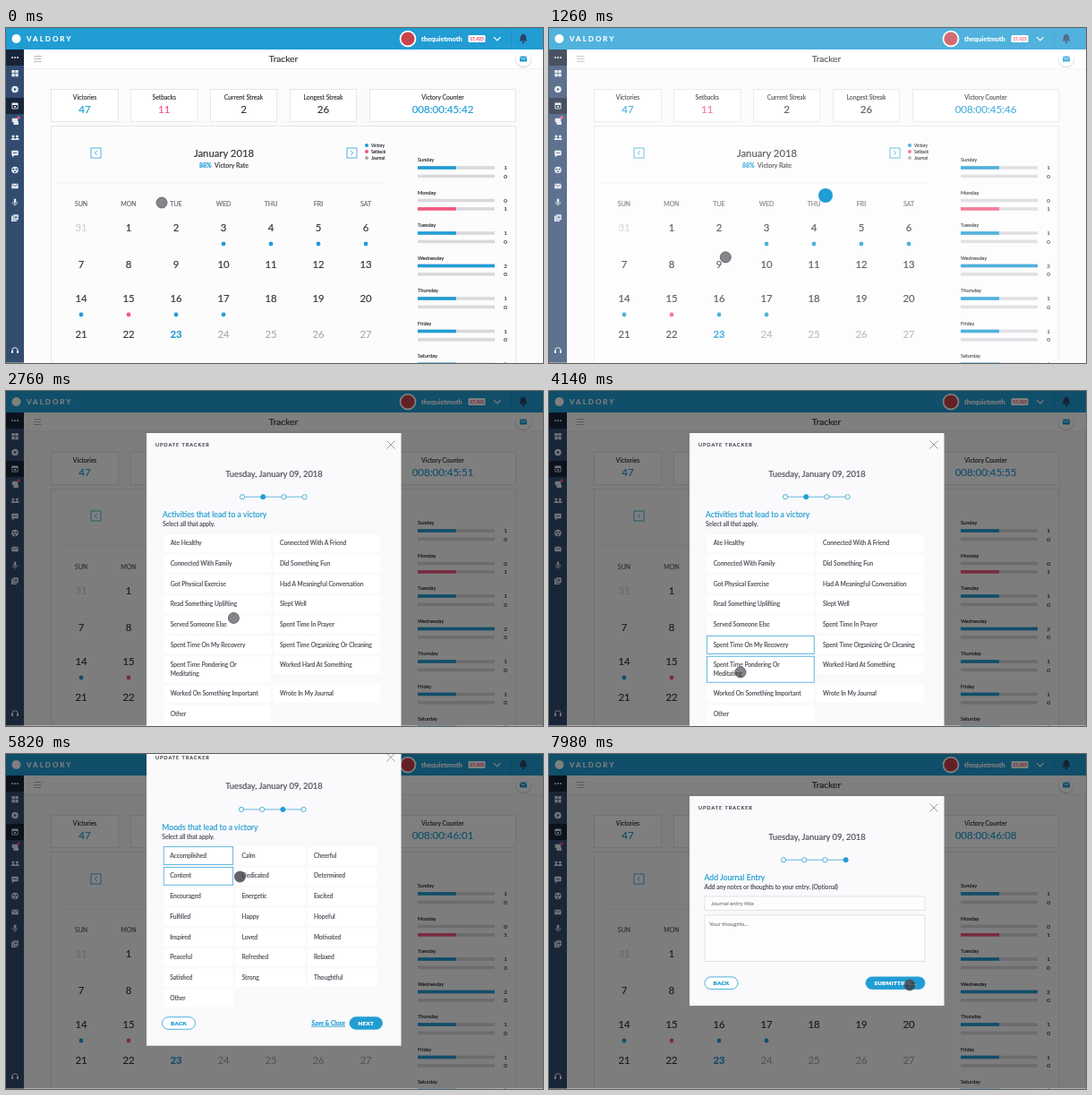
An HTML page that plays this animation: 600x374 px, repeating every 8000 ms.

```html
<!DOCTYPE html>
<html lang="en">
<head>
<meta charset="utf-8">
<title>Tracker</title>
<style>
html, body { margin: 0; width: 100%; height: 100%; overflow: hidden; background: #fcfafc; }
svg { display: block; width: 100%; height: 100%; font-family: Lato, "Open Sans", sans-serif; }
text { fill: currentColor; stroke: currentColor; stroke-width: .18px; }
</style>
</head>
<body>
<svg id="stage" viewBox="0 0 600 374"></svg>
<script>
const LOOP = 8000;
const BLUE = '#219dd4', PINK = '#f4577f', INK = '#33353b', SOFT = '#4c4f57', GREY = '#a9a9ad';

// Moments of the recorded session, in ms
const AT = {
  load: 900, open: 1400, victory: 1860, activities: 2300,
  moods: 4800, journal: 7200, submit: 7700
};

// Cursor path: time, x, y
const PATH = [
  [0, 174, 195], [150, 174, 195], [800, 191, 264], [1180, 191, 264], [1660, 274, 157],
  [1900, 274, 157], [2180, 299, 216], [2350, 299, 216], [3120, 218, 284], [3340, 218, 284],
  [3740, 214, 314], [4260, 214, 314], [4660, 392, 301], [4960, 392, 301], [5280, 214, 114],
  [5400, 214, 114], [5600, 214, 137], [5720, 214, 137], [6000, 374, 137], [6120, 374, 137],
  [6320, 372, 160], [6430, 372, 160], [6620, 365, 205], [6820, 365, 205], [7080, 402, 301],
  [7240, 402, 301], [7620, 403, 258], [8000, 403, 258]
];
const CLICKS = [900, 1860, 2270, 3240, 3800, 4760, 5340, 5660, 6060, 6380, 6690, 7150, 7700];

// ---- markup helpers ----
function text(x, y, s, size, o = {}) {
  const { fill = INK, anchor = 'middle', weight = 400, gap = 0, extra = '' } = o;
  return `<text x="${x}" y="${y + size * 0.36}" font-size="${size}" color="${fill}" ` +
    `text-anchor="${anchor}" font-weight="${weight}" letter-spacing="${gap}" ${extra}>${s}</text>`;
}
const left = (x, y, s, size, o = {}) => text(x, y, s, size, { anchor: 'start', ...o });
const rect = (x, y, w, h, fill, extra = '') =>
  `<rect x="${x}" y="${y}" width="${w}" height="${h}" fill="${fill}" ${extra}/>`;
const circle = (x, y, r, fill, extra = '') =>
  `<circle cx="${x}" cy="${y}" r="${r}" fill="${fill}" ${extra}/>`;
const line = (d, color, w = 1) =>
  `<path d="${d}" fill="none" stroke="${color}" stroke-width="${w}"/>`;
const group = (id, body, extra = '') => `<g id="${id}" ${extra}>${body}</g>`;
const range = n => [...Array(n).keys()];

// ---- page ----
function header() {
  return rect(0, 0, 600, 24, BLUE) +
    circle(11.5, 12, 5, '#fff') +
    left(23, 12, 'VALDORY', 8, { fill: '#fff', weight: 700, gap: 2 }) +
    circle(449, 12, 9.3, '#fff') + circle(449, 12, 7.6, '#c8434a') +
    left(464, 12, 'thequietmoth', 7.5, { fill: '#fff', weight: 700 }) +
    rect(516.5, 8, 19, 8, '#fff', 'rx="1.2"') +
    text(526, 12, '17,425', 5, { fill: PINK, weight: 700 }) +
    line('M545 10.2l3.8 3.8 3.8-3.8', '#fff', 1.2) +
    line('M564.5 3V21', '#1c8dc0', 0.8) +
    '<path d="M573.5 14.5c1.5-1.2 1-5 2-6.3q2.5-2.8 5 0c1 1.3 .5 5.1 2 6.3z" fill="#2b4468"/>' +
    circle(578, 16, 1.3, '#2b4468') +
    rect(20, 24, 580, 21, '#fff') + line('M20 45.3H600', '#ececef', 0.7) +
    line('M31 31.5h8.5M31 34.5h8.5M31 37.5h8.5', '#b5b5ba', 0.9) +
    text(310, 34.3, 'Tracker', 10.2) +
    circle(578, 35, 9.3, '#d6d6da') + circle(578, 34.3, 8.8, '#fff') +
    rect(574, 31.5, 8, 6, BLUE, 'rx=".6"') + line('M574.3 32.3l3.7 2.6 3.7-2.6', '#fff', 0.8);
}

function sidebar() {
  const c = '#e3e9f1';
  const box = (y, w, h) => rect(10 - w / 2, y - h / 2, w, h, c, 'rx=".8"');
  const person = (x, y) => circle(x, y - 1.6, 1.5, c) +
    `<path d="M${x - 2.4} ${y + 2.6}q0-2.4 2.4-2.4t2.4 2.4z" fill="${c}"/>`;
  return rect(0, 24, 20, 350, '#324c70') + rect(0, 24, 20, 18, '#182438') +
    rect(0, 78, 20, 18, '#182438') +
    [7, 10, 13].map(x => circle(x, 33, 0.9, '#fff')).join('') +
    [[6.4, 47], [10.4, 47], [6.4, 51], [10.4, 51]].map(([x, y]) => rect(x, y, 3.3, 3.3, c)).join('') +
    circle(10, 68.5, 3.8, c) + '<path d="M9 66.7l2.8 1.8-2.8 1.8z" fill="#324c70"/>' +
    box(87, 7, 7) + rect(7.4, 86, 5.2, 3.6, '#182438') + rect(9, 87, 2, 1.7, c) +
    box(103, 6.5, 4.5) + rect(8.5, 104.5, 5.5, 3.5, c) + circle(14, 100, 1.7, PINK) +
    person(8, 122.5) + person(12.4, 122.5) +
    box(139.5, 7.5, 5.5) + `<path d="M7 142v2.5l2.5-2.5z" fill="${c}"/>` +
    rect(8, 139, 4, 0.8, '#324c70') +
    circle(10, 158.5, 3.8, c) +
    [[8.4, 157.7], [11.6, 157.7], [10, 160.4]].map(([x, y]) => circle(x, y, 1, '#324c70')).join('') +
    box(176.5, 7.5, 5.6) + line('M6.5 174.5l3.5 2.3 3.5-2.3', '#324c70', 0.7) +
    rect(8.8, 190.5, 2.5, 5, c, 'rx="1.2"') + line('M7.2 194.2q0 2.7 2.8 2.7t2.8-2.7M10 197v1.7', c, 0.8) +
    rect(6, 209.5, 6, 6.5, c) + rect(8, 208, 6, 6.5, c, 'stroke="#324c70" stroke-width=".5"') +
    line('M11 209.5v3.6M9.2 211.3h3.6', '#324c70', 0.8) +
    line('M6.8 361.5v-1.5a3.2 3.2 0 0 1 6.4 0v1.5', c, 1) + rect(6, 360, 2, 3, c) + rect(12, 360, 2, 3, c);
}

function stats() {
  const card = (x, w, label, value, fill, id) =>
    rect(x, 68.5, w, 36, '#fff', 'stroke="#dddde1" stroke-width=".7"') +
    text(x + w / 2, 78, label, 6.8) +
    text(x + w / 2, 91.3, value, 11.5, { fill, extra: `stroke-width=".3" ${id ? `id="${id}"` : ''}` });
  return card(50.5, 75, 'Victories', 47, BLUE) + card(139.5, 74.5, 'Setbacks', 11, PINK) +
    card(228.5, 74, 'Current Streak', 2, INK) + card(317.5, 74, 'Longest Streak', 26, INK) +
    card(406.5, 163, 'Victory Counter', '', BLUE, 'counter');
}

function calendar() {
  const colX = i => 84 + 53 * i, rowY = [222.5, 264, 301.5, 342.3];
  const arrow = (x, d) => rect(x, 134, 11, 11, '#fff', `stroke="${BLUE}" stroke-width=".8"`) +
    line(`M${x + 5.5 - d * 1.2} 137.2l${d * 2.4} 2.3l${-d * 2.4} 2.3`, BLUE, 0.9);
  let s = rect(50.5, 109.5, 519, 280, '#fdfcfd', 'stroke="#dddde1" stroke-width=".7"') +
    arrow(95, -1) + arrow(381, 1) +
    text(243.5, 139.5, 'January 2018', 11.3) +
    left(216, 153.3, '88%', 6.8, { fill: BLUE, weight: 700 }) + left(233, 153.3, 'Victory Rate', 7) +
    line('M58 173H422', '#e6e6ea', 0.7);
  ['Victory', 'Setback', 'Journal'].forEach((name, i) => {
    s += circle(403, 131 + 7 * i, 2.1, [BLUE, PINK, GREY][i]) + left(408, 131 + 7 * i, name, 4.7);
  });
  ['SUN', 'MON', 'TUE', 'WED', 'THU', 'FRI', 'SAT'].forEach((d, i) => {
    s += text(colX(i), 196.3, d, 7, { fill: '#6c6d73' });
  });
  for (const i of range(28)) {
    const day = i || 31;
    const fill = i === 0 ? '#cfcfd3' : i === 23 ? BLUE : i > 23 ? GREY : INK;
    s += text(colX(i % 7), rowY[i / 7 | 0], day, 11.3,
      { fill, weight: i === 23 ? 700 : 400, extra: `id="day${i}"` });
  }
  for (const i of [3, 4, 5, 6]) s += circle(colX(i), 241, 2.4, BLUE);
  for (const i of range(4)) s += circle(colX(i), 320, 2.4, i === 1 ? PINK : BLUE);
  return s;
}

function weekBars() {
  const bar = (y, n, fill) => rect(460, y - 1.8, 86, 3.6, '#d9d8dd') +
    rect(460, y - 1.8, 43 * n, 3.6, fill) + text(558, y, n, 6.3);
  return ['Sunday', 'Monday', 'Tuesday', 'Wednesday', 'Thursday', 'Friday', 'Saturday'].map((d, i) => {
    const y = 147 + 36.5 * i, wins = [1, 0, 1, 2, 1, 1, 1][i];
    return left(460, y, d, 5.7) + bar(y + 9, wins, BLUE) + bar(y + 18.4, i === 1 ? 1 : 0, PINK);
  }).join('');
}

// ---- dialog ----
const options = [];

function option(x, y, w, label, time) {
  const lines = label.split('|'), id = 'opt' + options.length;
  options.push({ id, time });
  return rect(x, y, w, lines.length > 1 ? 29 : 19.8, '#fff', `id="${id}" stroke-width=".7"`) +
    lines.map((l, i) => left(x + 7, y + 9.7 + 9.3 * i, l, 6.7, { fill: SOFT })).join('');
}

function pill(x, y, w, label, filled, color = BLUE) {
  return rect(x, y - 6.8, w, 13.6, filled ? color : '#fff', `rx="6.8" stroke="${color}" stroke-width=".8"`) +
    text(x + w / 2, y, label, 6.2, { weight: 900, gap: 0.3, fill: filled ? '#fff' : color });
}

function dialog(h, body) {
  return rect(157, 47, 284.5, h - 47, '#faf9fb') +
    left(167, 60, 'UPDATE TRACKER', 5.6, { gap: 0.95 }) +
    line('M425.5 55.5l9 9m0-9l-9 9', '#77777d', 0.7) +
    text(299.5, 92.3, 'Tuesday, January 09, 2018', 9.4, { fill: SOFT }) + body;
}

function steps(x, active) {
  return line(`M${x} 118.2h69.6`, BLUE, 0.7) + range(4).map(i =>
    circle(x + 23.2 * i, 118.2, 2.6, i === active ? BLUE : '#fff', `stroke="${BLUE}" stroke-width=".8"`)).join('');
}

const heading = (x, title, note) =>
  left(x, 138.3, title, 8.7, { fill: BLUE }) + left(x, 149, note, 6.7, { fill: SOFT });

const footer = y => pill(174.5, y, 37, 'BACK') + pill(384, y, 36.5, 'NEXT', true) +
  left(341.5, y, 'Save &amp; Close', 6.5, { fill: BLUE, weight: 700, extra: 'text-decoration="underline"' });

function choiceDialog() {
  const round = (x, label, color, id) =>
    circle(x, 158, 23.7, '#fff', `id="${id}" stroke="${color}" stroke-width=".65"`) +
    text(x, 158.2, label, 6.7, { extra: `id="${id}Label"` });
  return dialog(250.5,
    text(299, 118, 'Specify if you are recording a victory or a setback for this day.', 6.6, { fill: SOFT }) +
    round(268, 'VICTORY', BLUE, 'win') + round(331, 'SETBACK', PINK, 'loss') +
    text(299, 158, 'or', 6.8, { fill: SOFT }) +
    line('M176 198.5H423', '#dcdce0', 0.6) +
    group('nextOff', pill(281, 216.5, 36.5, 'NEXT', true, '#666d75')) +
    group('nextOn', pill(281, 216.5, 36.5, 'NEXT', true)));
}

function activityDialog() {
  const pairs = [
    ['Ate Healthy', 'Connected With A Friend'], ['Connected With Family', 'Did Something Fun'],
    ['Got Physical Exercise', 'Had A Meaningful Conversation'], ['Read Something Uplifting', 'Slept Well'],
    ['Served Someone Else', 'Spent Time In Prayer'],
    ['Spent Time On My Recovery', 'Spent Time Organizing Or Cleaning'],
    ['Spent Time Pondering Or|Meditating', 'Worked Hard At Something'],
    ['Worked On Something Important', 'Wrote In My Journal'], ['Other']
  ];
  const picked = { 5: 3240, 6: 3800 };
  return dialog(415, steps(264, 1) + heading(175, 'Activities that lead to a victory', 'Select all that apply.') +
    pairs.map((pair, r) => pair.map((label, c) =>
      option(c ? 299 : 176.7, 160 + 22.7 * r + (r > 6 ? 9.3 : 0), 119.5, label, c ? 0 : picked[r])).join('')).join('') +
    footer(390));
}

function moodDialog() {
  const moods = ('Accomplished Calm Cheerful Content Dedicated Determined Encouraged Energetic Excited ' +
    'Fulfilled Happy Hopeful Inspired Loved Motivated Peaceful Refreshed Relaxed ' +
    'Satisfied Strong Thoughtful Other').split(' ');
  const picked = { Accomplished: 5340, Content: 5660, Determined: 6060, Excited: 6380, Motivated: 6690 };
  return dialog(382, steps(263, 2) + heading(174.3, 'Moods that lead to a victory', 'Select all that apply.') +
    moods.map((m, i) => option(176.2 + 80.4 * (i % 3), 160 + 22.7 * (i / 3 | 0), 77.5, m, picked[m])).join('') +
    footer(356.8));
}

function journalDialog() {
  const field = (y, h) => rect(174, y, 246, h, '#fdfdfe', 'stroke="#d8d8dd" stroke-width=".7"');
  return dialog(281, steps(262, 3) +
    heading(173.5, 'Add Journal Entry', 'Add any notes or thoughts to your entry. (Optional)') +
    field(159, 15.5) + left(181, 167, 'Journal entry title', 6.2, { fill: '#8a8a90' }) +
    field(180, 51.5) + left(179, 189.3, 'Your thoughts...', 6.4, { fill: '#8a8a90' }) +
    pill(174, 255.7, 37, 'BACK') +
    group('submit', pill(375, 255.7, 45, 'SUBMIT', true)) +
    group('submitting', pill(354, 255.7, 66, 'SUBMITTING...', true)));
}

const stage = document.getElementById('stage');
stage.innerHTML =
  stats() + calendar() + weekBars() + header() + sidebar() +
  group('loader', rect(0, 0, 600, 374, '#fff', 'opacity=".21"') + circle(309, 187, 8, BLUE)) +
  group('shade', rect(0, 0, 600, 374, '#000', 'opacity=".5"')) +
  group('modal',
    group('choice', choiceDialog()) + group('activity', activityDialog()) +
    group('mood', moodDialog()) + group('journal', journalDialog())) +
  rect(0, 373.4, 600, 0.6, '#fff', 'opacity=".6"') +
  group('cursor', circle(0, 0, 6, '#3b3b42', 'id="dot" stroke="#55555c" stroke-width=".8"'));

// ---- motion ----
const $ = id => document.getElementById(id);
const set = (id, name, value) => $(id).setAttribute(name, value);
const show = (id, on) => set(id, 'display', on ? 'inline' : 'none');
const ramp = (t, a, b) => Math.min(1, Math.max(0, (t - a) / (b - a)));
const ease = k => k * k * (3 - 2 * k);
const pad = n => String(n).padStart(2, '0');

function cursorAt(t) {
  const i = Math.max(1, PATH.findIndex(p => p[0] >= t));
  const [t0, x0, y0] = PATH[i - 1], [t1, x1, y1] = PATH[i];
  const k = ease(ramp(t, t0, t1));
  return [x0 + (x1 - x0) * k, y0 + (y1 - y0) * k];
}

function scrollAt(t) {
  if (t < AT.moods) return 89 * ease(ramp(t, 4260, 4560));
  return t < AT.journal ? 56.3 : 0;
}

function draw(t) {
  const secs = 42 + Math.floor(t * 0.0033);
  $('counter').textContent = `008:00:${pad(45 + Math.floor(secs / 60))}:${pad(secs % 60)}`;

  const load = ramp(t, AT.load, AT.load + 120) * (1 - ramp(t, AT.open - 20, AT.open + 80));
  set('loader', 'opacity', load);
  const open = ease(ramp(t, AT.open, AT.open + 220));
  set('shade', 'opacity', open);
  set('modal', 'opacity', open);
  set('modal', 'transform', `translate(0 ${-30 * (1 - open) - scrollAt(t)})`);
  const marked = t >= AT.open;
  set('day9', 'color', marked ? BLUE : INK);
  set('day9', 'font-weight', marked ? 700 : 400);
  set('day9', 'font-size', marked ? 12.5 : 11.3);

  show('modal', t >= AT.open);
  show('choice', t < AT.activities);
  show('activity', t >= AT.activities && t < AT.moods);
  show('mood', t >= AT.moods && t < AT.journal);
  show('journal', t >= AT.journal);

  const won = t >= AT.victory;
  set('win', 'fill', won ? BLUE : '#fff');
  set('winLabel', 'color', won ? '#fff' : INK);
  show('nextOff', !won);
  show('nextOn', won);
  show('submit', t < AT.submit);
  show('submitting', t >= AT.submit);

  for (const { id, time } of options) set(id, 'stroke', time && t >= time ? BLUE : 'none');

  const [x, y] = cursorAt(t);
  const pressed = CLICKS.some(c => t >= c - 50 && t < c + 290);
  set('cursor', 'transform', `translate(${x} ${y})`);
  set('dot', 'fill-opacity', pressed ? 0.8 : 0.62);
}

const start = performance.now();
function tick() {
  draw((performance.now() - start) % LOOP);
  requestAnimationFrame(tick);
}
draw(0);
tick();
</script>
</body>
</html>
```
